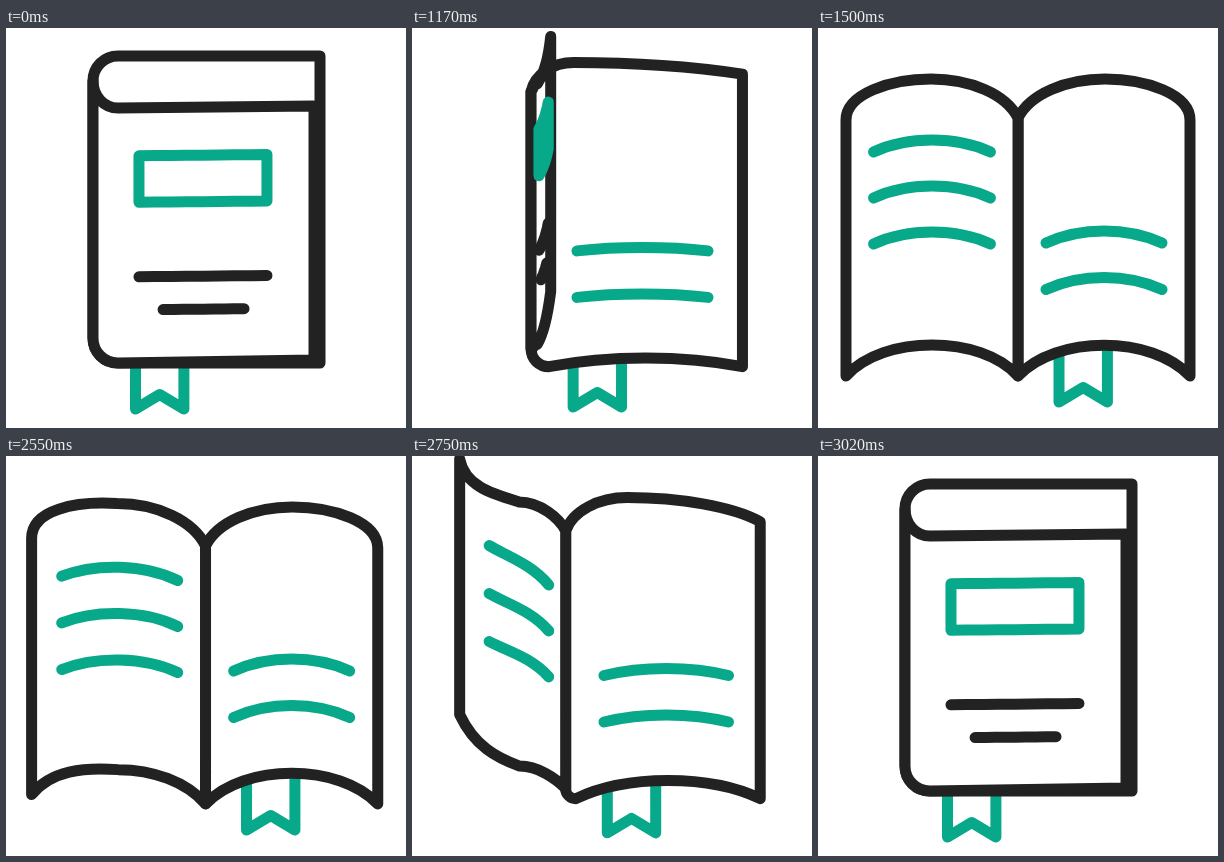
An HTML page for the animation above (3.05 s loop, 400x400 px).

```html
<!DOCTYPE html>
<html lang="en">
<head>
<meta charset="utf-8">
<title>Opening book</title>
<style>
  html, body { margin: 0; width: 100%; height: 100%; overflow: hidden; background: #fff; }
  svg { display: block; width: 100%; height: 100%; }
  path { fill: none; stroke: #222; stroke-width: 11; stroke-linecap: round; stroke-linejoin: round; }
  .paper { fill: #fff; }
  .green { stroke: #08a88a; }
</style>
</head>
<body>
<svg viewBox="0 0 400 400">
  <path id="bookmark" class="green"/>
  <path id="body" class="paper"/>
  <path id="rightText" class="green"/>
  <path id="cover" class="paper"/>
  <path id="label" class="green"/>
  <path id="title"/>
  <path id="leftText" class="green"/>
</svg>
<script>
const LOOP = 3050, STEPS = 20;

const mix = (a, b, k) => a + (b - a) * k;
const blend = (from, to, k) => from.map((p, i) => [mix(p[0], to[i][0], k), mix(p[1], to[i][1], k)]);
const mirror = points => points.map(([x, y]) => [400 - x, y]);
const curve = points => `M${points[0]}C${points.slice(1).join(" ")}`;
const draw = (id, d) => document.getElementById(id).setAttribute("d", d);

// Edges are two chained cubics from the spine outwards.
// When closed: a rounded corner at the spine, then a straight run.
function hinge(start, level, right, end) {
  const run = [0, 1 / 3, 2 / 3, 1].map(k => [mix(112, right, k), mix(level, end, k)]);
  return [[87, start], [87, mix(start, level, .56)], [98, level], ...run];
}

const spineFoot = [200, 348];
const pageTop = [[200, 90], [212, 66], [248, 51], [287, 51], [328, 51], [372, 66], [372, 92]];
const pageBottom = [spineFoot, spineFoot, spineFoot, spineFoot, [238, 307], [334, 307], [372, 348]];
const coverBottom = [spineFoot, [181, 327], [148, 317], [114, 317], [80, 317], [47, 327], [28, 348]];

const body = {
  top: [hinge(53, 28, 314, 28), pageTop],
  bottom: [hinge(310, 335, 314, 335), pageBottom]
};
const cover = {
  top: [hinge(53, 80, 308, 78), mirror(pageTop)],
  bottom: [hinge(310, 335, 308, 332), coverBottom]
};
// How far each control point of the cover rises while it turns.
const RISE = [0, 4, 10, 10, 18, 38];
const EDGE_RISE = 88;

// Horizontal distances from the spine shrink and flip with `swing`; heights rise with `bend`.
function flap([closed, open], spine, swing, bend) {
  const reach = points => points[6][0] - points[0][0];
  const fraction = (points, i) => (points[i][0] - points[0][0]) / reach(points);
  const width = mix(reach(closed), reach(open), swing);
  const points = closed.map((p, i) => [
    spine[0] + width * mix(fraction(closed, i), fraction(open, i), swing),
    mix(p[1], open[i][1], swing) - (i < 6 ? RISE[i] * bend : EDGE_RISE * bend * bend)
  ]);
  return [spine, ...points.slice(1)];
}

// Closed sheet between a top and a bottom edge, both starting at the spine.
function sheet(top, bottom) {
  const back = [...bottom].reverse();
  return `${curve(top)}L${back[0]}C${back.slice(1).join(" ")}Z`;
}

function pointOn([p, q, r, s], k) {
  const m = 1 - k;
  return [0, 1].map(i => m*m*m*p[i] + 3*m*m*k*q[i] + 3*m*k*k*r[i] + k*k*k*s[i]);
}

// Strip on the cover that follows its top edge at a given depth.
function strip(edge, from, to, depth) {
  return Array.from({ length: 9 }, (_, i) => {
    const [x, y] = pointOn(edge, mix(from, to, i / 8));
    return [x, y + depth];
  });
}

function drawFront(face) {
  const box = [...strip(face, .107, .76, 48), ...strip(face, .76, .107, 94.5)];
  draw("label", `M${box.join("L")}Z`);
  draw("title", `M${strip(face, .107, .76, 169).join("L")}M${strip(face, .23, .643, 202).join("L")}`);
  draw("leftText", "");
}

// Three arched lines whose outer ends are pulled up and inwards by the turning page.
function drawInside(spineX, width, bend) {
  const lift = bend * bend, far = .84 - .12 * lift;
  const row = i => [[0, 124, -35], [.29, 108, -8], [.71, 108, 0], [1, 124, 5]].map(([k, y, pull]) => [
    spineX + width * mix(far, .16, k),
    y + pull * lift + i * (46 + 2 * bend * (1 - k))
  ]);
  draw("leftText", [0, 1, 2].map(i => curve(row(i))).join(""));
  draw("label", "");
  draw("title", "");
}

function drawRightText(s) {
  const left = mix(140, 228, s), right = mix(277, 344, s);
  const end = mix(226, 215, s), crest = mix(226, 199, s);
  const row = dy => curve([
    [left, end + dy], [mix(left, right, .3), crest + dy],
    [mix(left, right, .7), crest + dy], [right, end + dy]
  ]);
  draw("rightText", row(0) + row(46.5));
}

function drawBookmark(s) {
  draw("bookmark", `M${mix(129.5, 241, s)} 322V${mix(381, 374, s)}l24.2 -14.5l24.2 14.5V322`);
}

function render(u) {
  const wave = Math.max(0, Math.sin(Math.PI * u));
  const slide = .5 - .5 * Math.cos(Math.PI * u) + .012 * wave;
  const swing = slide + .258 * wave * (1 - u ** 5);
  const bend = wave ** .6;

  drawBookmark(slide);
  const top = blend(...body.top, slide), bottom = blend(...body.bottom, slide);
  draw("body", sheet(top, bottom));
  drawRightText(slide);

  const flapTop = flap(cover.top, top[0], swing, bend);
  draw("cover", sheet(flapTop, flap(cover.bottom, bottom[0], swing, bend)));
  const spineX = top[0][0], width = flapTop[6][0] - spineX;
  if (width > 0) drawFront(flapTop.slice(3));
  else drawInside(spineX, width, bend);
}

function progress(t) {
  const step = (start, length) =>
    (1 + Math.floor((t - start) / length * (STEPS - 1) + .25)) / STEPS;
  if (t < 1020) return 0;
  if (t < 1500) return step(1020, 480);
  if (t < 2550) return 1;
  if (t < 3020) return 1 - step(2550, 470);
  return 0;
}

function frame() {
  render(progress(performance.now() % LOOP));
  requestAnimationFrame(frame);
}
frame();
</script>
</body>
</html>
```
